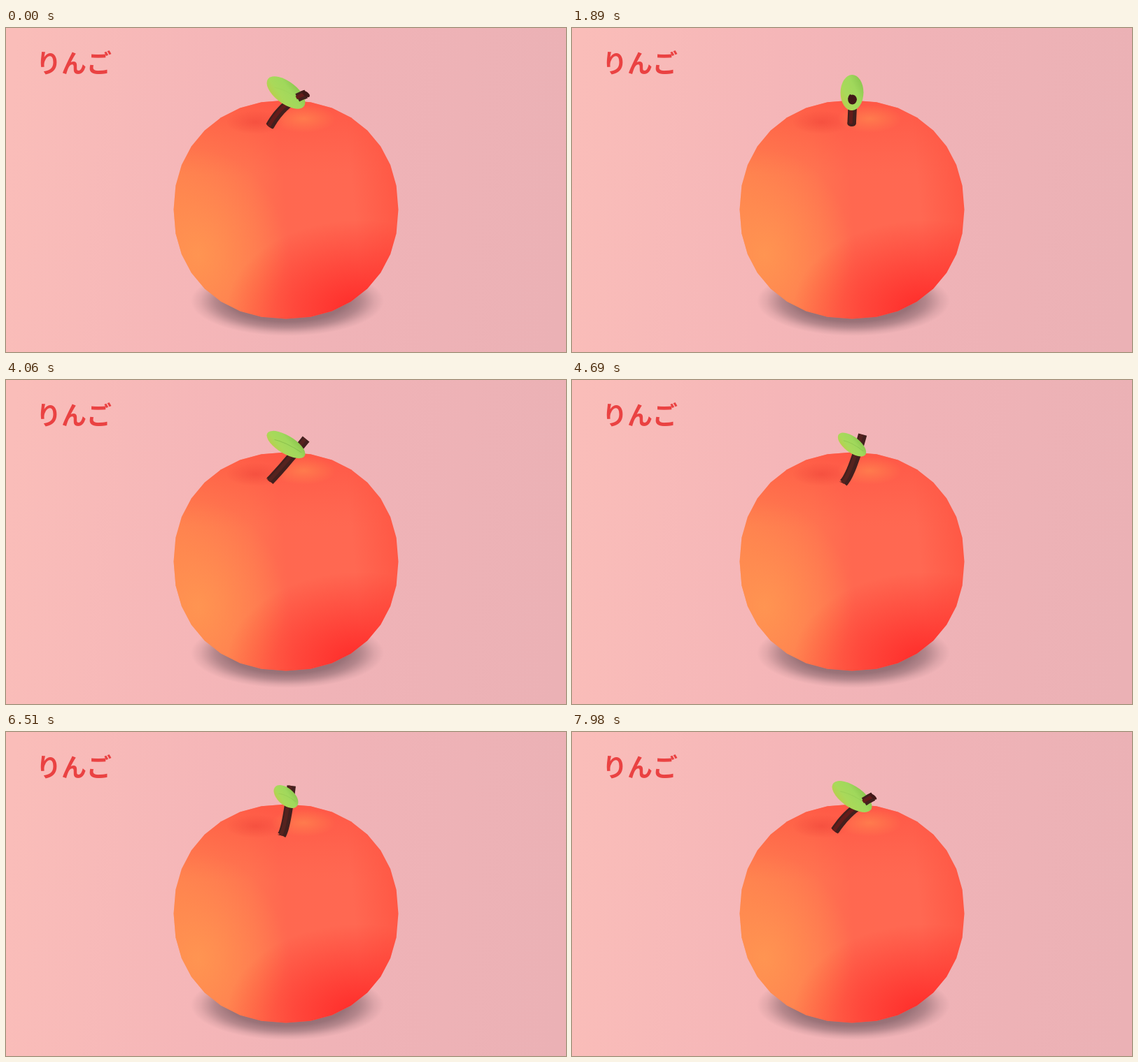
These frames come from a looping animation (800 by 464 pixels, 8 s). An HTML page with a canvas:

```html
<!DOCTYPE html>
<html lang="ja">
<head>
<meta charset="utf-8">
<style>
  html, body { margin: 0; width: 100%; height: 100%; overflow: hidden; background: #f4b5b7; }
  canvas { display: block; }
</style>
</head>
<body>
<canvas id="stage" width="800" height="464"></canvas>
<script>
const ctx = document.getElementById('stage').getContext('2d');
const LOOP = 8000, STEP = 70;
const SWING = 8130, SWING_START = 1700;
const TAU = Math.PI * 2;

function linear(x0, y0, x1, y1, stops) {
  const g = ctx.createLinearGradient(x0, y0, x1, y1);
  stops.forEach(([at, color]) => g.addColorStop(at, color));
  return g;
}

// Soft elliptical spot; stops run from the centre to the rim.
function glow(x, y, rx, ry, stops) {
  ctx.save();
  ctx.translate(x, y);
  ctx.scale(rx, ry);
  const g = ctx.createRadialGradient(0, 0, 0, 0, 0, 1);
  stops.forEach(([at, color]) => g.addColorStop(at, color));
  ctx.fillStyle = g;
  ctx.fillRect(-1, -1, 2, 2);
  ctx.restore();
}

function fade(x, y, rx, ry, rgb, alpha) {
  glow(x, y, rx, ry, [[0, `rgba(${rgb},${alpha})`], [0.5, `rgba(${rgb},${alpha * 0.5})`], [1, `rgba(${rgb},0)`]]);
}

function drawBackground() {
  ctx.fillStyle = linear(0, 200, 800, 264, [
    [0, '#fabdb9'], [0.35, '#f5b6b8'], [0.6, '#f0b3b7'], [1, '#ebb1b5']]);
  ctx.fillRect(0, 0, 800, 464);
  ctx.fillStyle = '#ea4242';
  ctx.font = '700 36px "Noto Sans CJK JP", "Noto Sans CJK", sans-serif';
  ctx.fillText('りんご', 43, 64);
  const dark = '92,68,76';
  glow(402, 391, 138, 50, [
    [0, `rgba(${dark},.75)`], [0.6, `rgba(${dark},.58)`], [0.75, `rgba(${dark},.4)`],
    [0.9, `rgba(${dark},.12)`], [1, `rgba(${dark},0)`]]);
}

function appleOutline() {
  const power = 2 / 2.15, sides = 32;
  const round = v => Math.sign(v) * Math.abs(v) ** power;
  ctx.beginPath();
  for (let i = 0; i < sides; i++) {
    const a = i / sides * TAU;
    ctx.lineTo(400 + 160.5 * round(Math.cos(a)), 260 + 156.5 * round(Math.sin(a)));
  }
  ctx.closePath();
}

function drawApple() {
  ctx.save();
  appleOutline();
  ctx.clip();
  ctx.fillStyle = linear(240, 270, 560, 240, [
    [0, '#ff814e'], [0.35, '#ff7350'], [0.5, '#ff6850'], [0.8, '#ff6852'], [1, '#ff5845']]);
  ctx.fillRect(230, 90, 340, 340);
  ctx.fillStyle = linear(0, 103, 0, 210, [[0, 'rgba(255,78,64,.65)'], [1, 'rgba(255,90,70,0)']]);
  ctx.fillRect(230, 90, 340, 120);
  fade(275, 325, 125, 150, '255,154,82', 0.8);
  fade(505, 405, 190, 130, '255,38,38', 0.95);
  fade(356, 135, 42, 17, '228,50,46', 0.35);
  fade(425, 130, 46, 20, '255,130,78', 0.8);
  ctx.restore();
}

function stemPoint(p, u) {
  const mix = k => (1 - u) ** 2 * p.base[k] + 2 * u * (1 - u) * p.bend[k] + u * u * p.tip[k];
  return [mix(0), mix(1)];
}

function strokeStem(p, from, to, width, color, dx = 0) {
  ctx.beginPath();
  for (let i = 0; i <= 16; i++) {
    const [x, y] = stemPoint(p, from + (to - from) * i / 16);
    ctx.lineTo(x + dx, y);
  }
  ctx.lineWidth = width;
  ctx.strokeStyle = color;
  ctx.stroke();
}

function disc([x, y], rx, ry, angle, color) {
  ctx.beginPath();
  ctx.ellipse(x, y, rx, ry, angle, 0, TAU);
  ctx.fillStyle = color;
  ctx.fill();
}

function drawStem(p, from, facing) {
  strokeStem(p, from, 1, 12.5, '#43201e');
  strokeStem(p, from, 1, 5, facing > 0 ? '#641c1a' : '#55231f', -1.5);
}

function drawLeaf(s, c) {
  const xx = 270 + 570 * s * s;
  const yy = 460 + 195 * c;
  const xy = 30 - 40 * c + s * (370 + 70 * c);
  const w = Math.sqrt(xx), skew = xy / w, h = Math.sqrt(yy - skew * skew);
  ctx.save();
  ctx.translate(400, 92.5);
  ctx.transform(w, skew, 0, h, 0, 0);
  ctx.beginPath();
  ctx.arc(0, 0, 1, 0, TAU);
  ctx.fillStyle = linear(-0.8, 0.7, 0.8, -0.5, [
    [0, '#b8cf4c'], [0.3, '#a9d95a'], [0.7, '#a0d85c'], [1, '#8fc951']]);
  ctx.fill();
  const crease = s * Math.max(0, 0.5 - c) * 0.6;
  ctx.beginPath();
  ctx.moveTo(-0.6, 0.05);
  ctx.quadraticCurveTo(0, -0.25, 0.8, 0.05);
  ctx.lineWidth = 0.06;
  ctx.strokeStyle = `rgba(110,165,60,${crease})`;
  ctx.stroke();
  ctx.restore();
}

function drawTop(angle) {
  const s = Math.sin(angle), c = Math.cos(angle), front = Math.max(0, c);
  const stem = {
    base: [400 - 25 * s, 142.5 - 5.5 * c],
    bend: [402 - 6 * s, 115 - 24 * c],
    tip: [400 + 31 * s, 89.5 + 13 * c]
  };
  const lean = s * 0.7;
  disc(stem.base, 6.2, 0.5 + 3.5 * front, lean, '#43201e');
  drawStem(stem, 0, c);
  drawLeaf(s, c);
  if (c > -0.2) {
    drawStem(stem, Math.min(1, 0.8 + Math.max(0, 0.2 - c) * 0.5), c);
    disc(stem.tip, 6.3, 1 + 6 * front, lean, '#421818');
  }
}

function frame(now) {
  const t = Math.floor(now % LOOP / STEP) * STEP;
  const angle = Math.PI / 2 * (1 - Math.cos(TAU * (t - SWING_START) / SWING));
  drawBackground();
  drawApple();
  drawTop(angle);
  requestAnimationFrame(frame);
}
requestAnimationFrame(frame);
</script>
</body>
</html>
```
